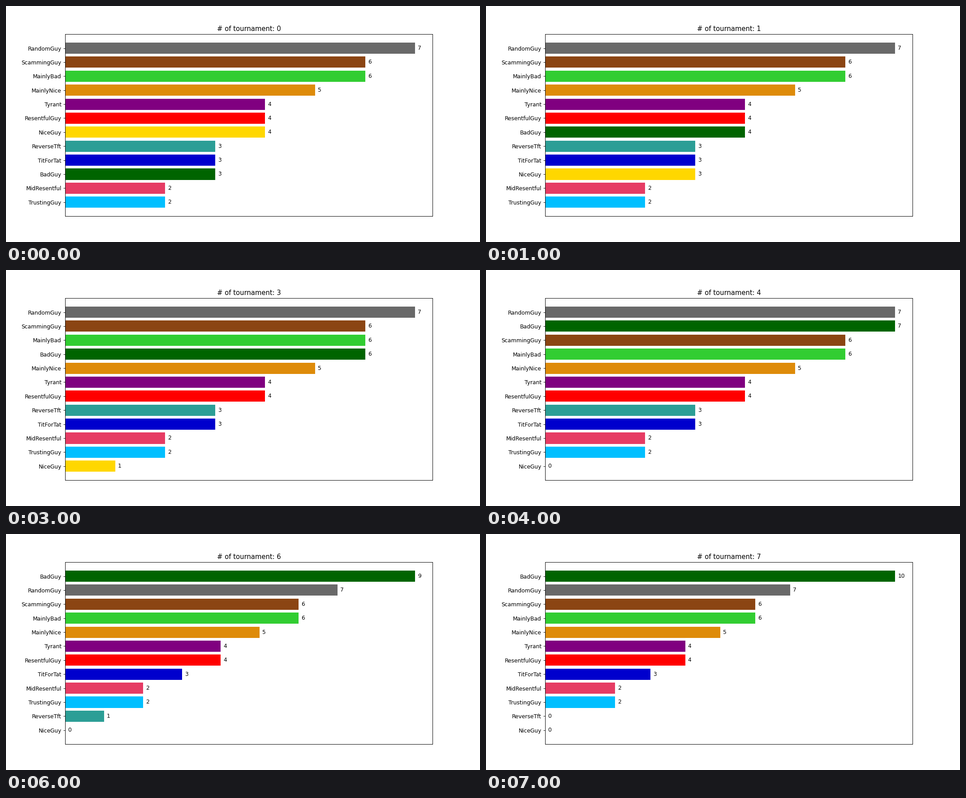
These frames come from a looping animation (1058 px wide and 529 px high, 8000 ms). A matplotlib script:

```python
import matplotlib.pyplot as plt
from matplotlib.animation import FuncAnimation

plt.rcParams["font.family"] = "DejaVu Sans"

ROUNDS = 8

# Listed in tie-break order: name, colour, population in a given round.
PLAYERS = [
    ("RandomGuy", "dimgray", lambda r: 7),
    ("ScammingGuy", "saddlebrown", lambda r: 6),
    ("MainlyBad", "limegreen", lambda r: 6),
    ("MainlyNice", "#de8b0a", lambda r: 5),
    ("Tyrant", "purple", lambda r: 4),
    ("ResentfulGuy", "red", lambda r: 4),
    ("ReverseTft", "#2c9e96", lambda r: min(3, 7 - r)),
    ("TitForTat", "mediumblue", lambda r: 3),
    ("MidResentful", "#e63c64", lambda r: 2),
    ("TrustingGuy", "deepskyblue", lambda r: 2),
    ("BadGuy", "darkgreen", lambda r: 3 + r),
    ("NiceGuy", "gold", lambda r: max(4 - r, 0)),
]

# 12 x 6 inches at this density is 1058 x 529 pixels.
fig, ax = plt.subplots(figsize=(12, 6), dpi=1058 / 12)


def draw_round(r):
    ax.clear()
    ranking = sorted(PLAYERS, key=lambda player: -player[2](r))
    names, colors, counts = zip(*reversed(ranking))
    bars = ax.barh(range(len(names)), [count(r) for count in counts],
                   color=colors, tick_label=names)
    ax.bar_label(bars, padding=5)
    ax.set_xticks([])
    ax.set_title(f"# of tournament: {r}")


anim = FuncAnimation(fig, draw_round, frames=ROUNDS, interval=1000,
                     repeat=True, repeat_delay=0)
plt.show()
```
